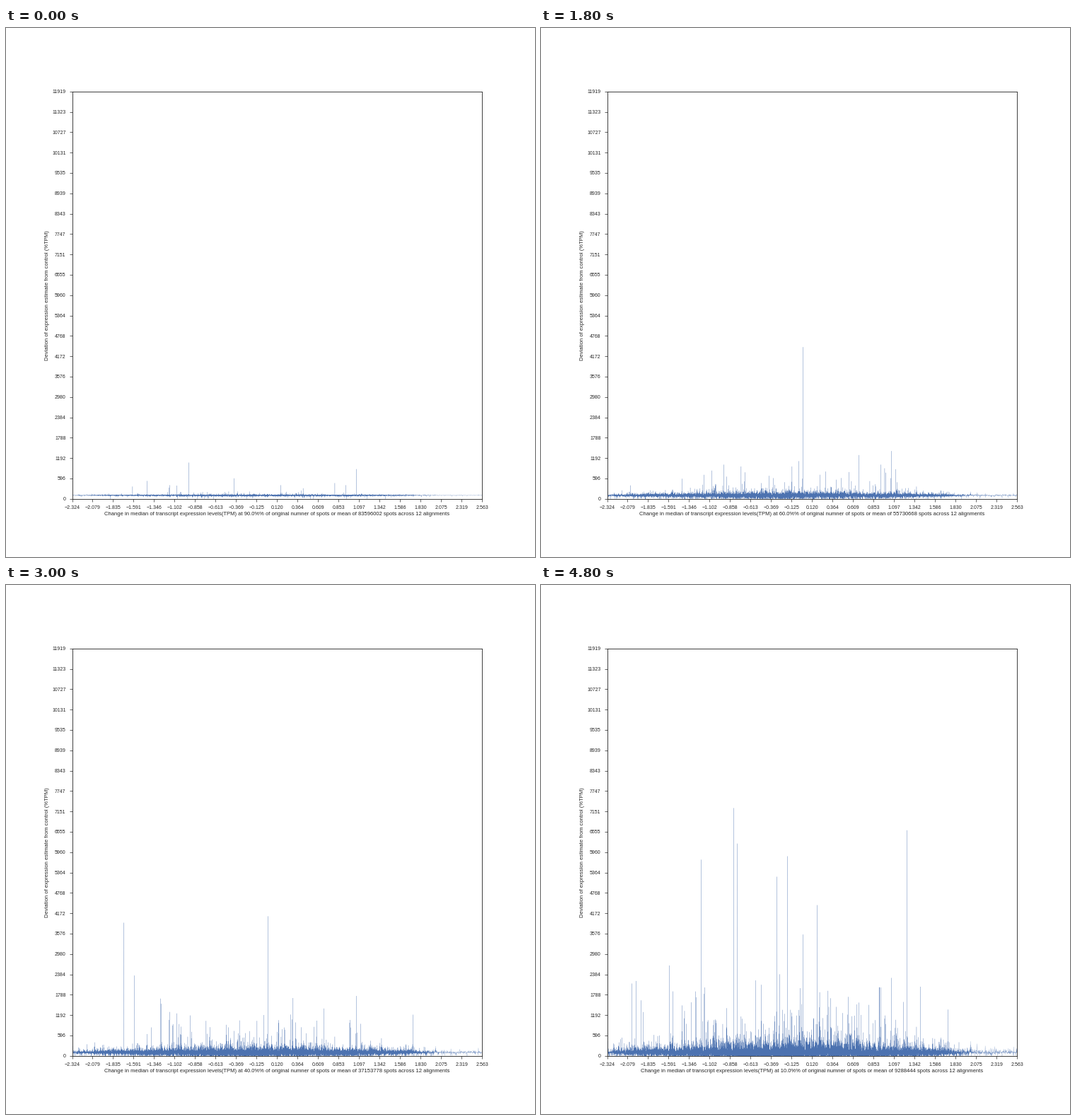
These frames come from a looping animation (748x748 px, 5.4 s). A matplotlib script:

```python
import numpy as np
import matplotlib.pyplot as plt
from matplotlib.animation import FuncAnimation

SIZE, DPI = 748, 50
STAGES = 9
TOTAL_SPOTS = 92884447
X_MIN, X_MAX, Y_MAX = -2.3237, 2.5634, 11919
LEFT, WIDTH = 0.125 * SIZE, 0.775 * SIZE
POINTS = 13000
SMALL_PEAKS = 65
INK = "0.15"
BLUE = "#4C72B0"

plt.rcParams.update({
    "font.family": "Liberation Sans",
    "text.color": INK,
    "path.simplify": False,
})

# Tallest peaks: pixel column, first and last stage, height at each
MAIN_PEAKS = [
    (495, 0, 8, 870, 2280),
    (258, 0, 4, 1060, 980),
    (506, 1, 2, 4890, 5590),
    (370, 3, 8, 4440, 3550),
    (166, 4, 7, 4172, 3340),
    (164, 6, 7, 7930, 11919),
    (260, 6, 6, 11420, 11420),
    (428, 6, 6, 7400, 7400),
    (333, 6, 8, 5080, 5240),
    (390, 6, 8, 5040, 4410),
    (277, 7, 8, 5310, 6210),
    (348, 7, 8, 5840, 5840),
    (226, 7, 8, 3140, 5740),
    (272, 8, 8, 7250, 7250),
    (517, 8, 8, 6600, 6600),
]


def spread_points():
    """Positions from 0 to 1, dense in the middle and sparser to the right."""
    grid = np.linspace(0, 1, 1000)
    right = 0.2 + 0.8 / (1 + np.exp((grid - 0.84) / 0.025))
    total = np.cumsum(np.minimum(1, 0.4 + grid / 0.15) * right)
    return np.interp(np.linspace(total[0], total[-1], POINTS), total, grid)


POS = spread_points()
X = X_MIN + POS * (X_MAX - X_MIN)
AMP = 0.2 + 0.8 * np.exp(-((POS - 0.46) / 0.31) ** 2)

rng = np.random.default_rng(12)
BASE_RANK = rng.uniform(1e-5, 1, POINTS)
SIGN = rng.choice([-1, 1], POINTS)

# Small peaks appear at a random stage, mostly late, and then grow slowly
PEAK_AT = np.searchsorted(POS, rng.beta(1.6, 1.9, SMALL_PEAKS) * 0.85)
ONSET = (STAGES * rng.random(SMALL_PEAKS) ** 0.6).astype(int)
HEIGHT = (350 + 110 * ONSET) * rng.uniform(0.03, 1, SMALL_PEAKS) ** -0.35


def profile(stage):
    local = np.random.default_rng(100 + stage)
    fresh = local.random(POINTS) < 0.3
    rank = np.where(fresh, local.uniform(1e-5, 1, POINTS), BASE_RANK)
    tail = 0.2 + 0.12 * np.exp(-stage / 1.3)
    body = 12 + 14 * stage + 0.09 * stage ** 3
    scale = body / (0.24 ** -tail - 1)
    y = 100 + SIGN * AMP * scale * (rank ** -tail - 1)
    y = np.clip(y, 0, 400 + 200 * stage)

    shown = ONSET <= stage
    y[PEAK_AT[shown]] = (HEIGHT * 1.04 ** (stage - ONSET))[shown]
    for col, first, last, start, end in MAIN_PEAKS:
        if first <= stage <= last:
            at = np.searchsorted(POS, (col + 0.5 - LEFT) / WIDTH)
            y[at] = start + (end - start) * (stage - first) / max(1, last - first)
    return y


def caption(stage):
    share = STAGES - stage
    spots = TOTAL_SPOTS * share // 10
    return (f"Change in median of transcript expression levels(TPM) at {share * 10:.1f}%% "
            f"of original numner of spots or mean of {spots} spots across 12 alignments")


fig = plt.figure(figsize=(SIZE / DPI, SIZE / DPI), dpi=DPI, facecolor="white")
ax = fig.add_axes([0.125, 0.11, 0.775, 0.77])
ax.set_xlim(X_MIN, X_MAX)
ax.set_ylim(0, Y_MAX)

xticks = np.linspace(X_MIN, X_MAX, 21)
yticks = np.linspace(0, Y_MAX, 21)
ax.set_xticks(xticks, [f"{v:.3f}".replace("-", "\u2212") for v in xticks])
ax.set_yticks(yticks, [f"{v:.0f}" for v in yticks])
ax.tick_params(length=6, width=1, pad=7, labelsize=10, color=INK, labelcolor=INK)
for spine in ax.spines.values():
    spine.set_edgecolor(INK)
    spine.set_linewidth(1.25)

middle = (LEFT + WIDTH / 2) / SIZE
xlabel = fig.text(middle, 1 - 689 / SIZE, "", size=11, ha="center", va="baseline")
fig.text(60 / SIZE, 1 - 378 / SIZE,
         "Deviation of expression estimate from control (%TPM)", size=11,
         rotation=90, rotation_mode="anchor", ha="center", va="baseline")
line, = ax.plot(X, profile(0), color=BLUE, lw=0.3, solid_joinstyle="bevel")


def update(stage):
    line.set_ydata(profile(stage))
    xlabel.set_text(caption(stage))
    return line, xlabel


anim = FuncAnimation(fig, update, frames=STAGES, interval=600, repeat=True)
plt.show()
```
